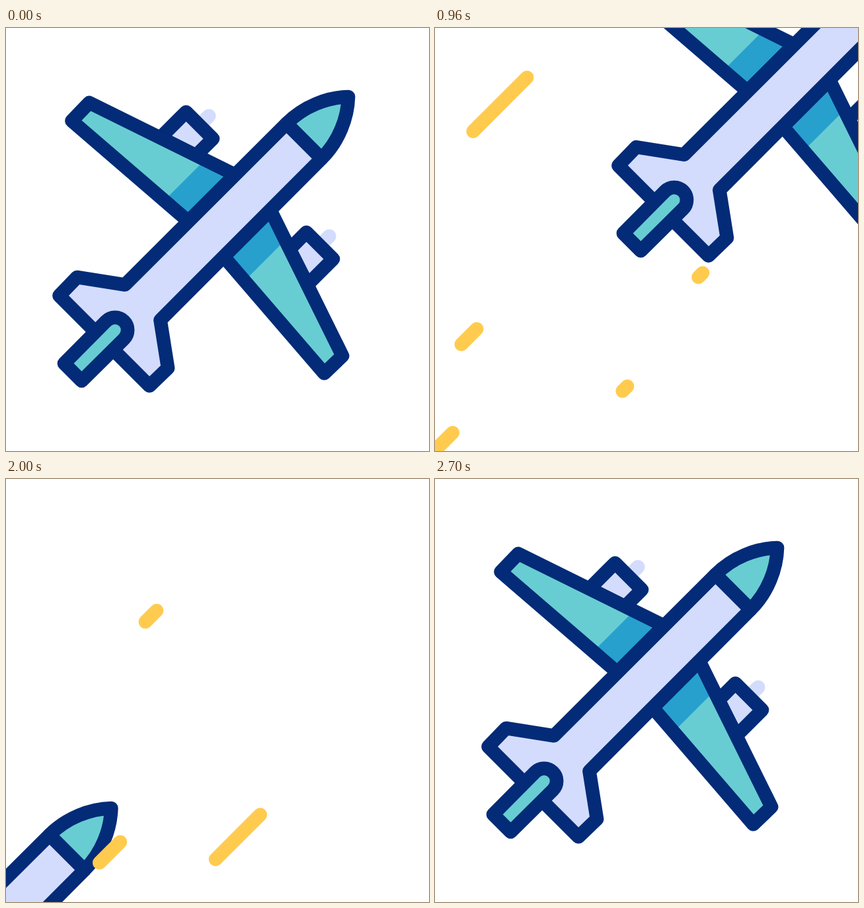
An HTML page that plays this animation: 640 by 640 pixels, repeating every 2.8 s.

```html
<!DOCTYPE html>
<html lang="en">
<head>
<meta charset="utf-8">
<title>Plane</title>
<style>
html, body { margin: 0; width: 100%; height: 100%; overflow: hidden; background: #fff; }
svg { display: block; width: 100vw; height: 100vh; }
.ink { stroke: #032b77; stroke-width: 20.7; stroke-linecap: round; stroke-linejoin: round; }
.pale { fill: #d3dcfd; }
.teal { fill: #68cdd2; }
.blue { fill: #27a0ce; }
.hub { stroke: #d3dcfd; stroke-width: 21; stroke-linecap: round; }
#streaks { stroke: #ffcb4f; stroke-width: 20.7; stroke-linecap: round; }
</style>
</head>
<body>
<svg viewBox="0 0 640 640">
  <defs>
    <path id="wing" d="M126 113 346.5 222 276 292.5 99.5 140.5Z"/>
    <clipPath id="root"><path d="M400 100.5V400H100.5Z"/></clipPath>
    <g id="side">
      <path class="hub" d="M293 147 307 133"/>
      <path class="ink pale" d="M233.7 165.8 272.5 127 313 167.5 287.4 193Z"/>
      <use href="#wing" class="teal"/>
      <use href="#wing" class="blue" clip-path="url(#root)"/>
      <use href="#wing" class="ink" fill="none"/>
    </g>
  </defs>
  <g id="plane">
    <use href="#side"/>
    <use href="#side" transform="matrix(0 -1 -1 0 622 622)"/>
    <path id="body" class="ink pale"/>
    <path class="ink teal" d="M424.5 144.5C451 118 486 105 518 104 517 136 504 171 477.5 197.5Z"/>
    <path class="ink teal" d="M88 507.5 151.5 443.5A19 19 0 0 1 178.5 470.5L114.5 534Z"/>
  </g>
  <g id="streaks"></g>
</svg>
<script>
const LOOP = 2800, GROW = 480, LAG = 203;
const AXIS = 622; // the plane is symmetric about x + y = AXIS
const plane = document.getElementById('plane');
const layer = document.getElementById('streaks');

// one side of the fuselage, nose to tail, closed by its mirror image
const half = [[424.5, 144.5], [180, 388.5], [107.5, 377], [80.5, 405]];
const mirror = ([x, y]) => [AXIS - y, AXIS - x];
const outline = [...half, ...half.map(mirror).reverse()];
document.getElementById('body').setAttribute('d', `M${outline.join('L')}Z`);

// streaks leave at a steady pace in three streams; each falls from x, y by a run along the diagonal
const streams = [
  { first: 212, step: 228, runs: [[93.5, 240, 72.5], [87, 552, 82], [67, 451.5, 41]] },
  { first: 344, step: 254, runs: [[523.5, 252, 125], [175, 39, 138], [291, 542, 56]] },
  { first: 1665, step: 121, runs: [[406, 486.5, 113.5], [173, 549, 75], [228, 199, 171]] }
];
const streaks = streams.flatMap(({ first, step, runs }) => runs.map(([x, y, run], i) => {
  const el = document.createElementNS('http://www.w3.org/2000/svg', 'path');
  layer.append(el);
  return { el, x, y, run, start: first + i * step };
}));

// eased 0..1 progress between two times
function ease(t, start, end) {
  const u = Math.min(1, Math.max(0, (t - start) / (end - start)));
  return u * u * (3 - 2 * u);
}

// draw back, fly off at the top right, return from the bottom left
function planeOffset(t) {
  if (t < 1528) {
    const d = -13.3 * ease(t, 200, 600) + 573 * ease(t, 600, 1480);
    return [d, -d];
  }
  const left = 1 - ease(t, 1528, 2700);
  return [-558 * left, 613 * left];
}

function drawStreak({ el, x, y, run, start }, t) {
  const live = t > start && t < start + LAG + GROW;
  el.style.display = live ? '' : 'none';
  if (!live) return;
  const at = begin => run * ease(t, begin, begin + GROW);
  const head = at(start), tail = at(start + LAG);
  el.setAttribute('d', `M${x - tail} ${y + tail}L${x - head} ${y + head}`);
}

function draw(t) {
  plane.setAttribute('transform', `translate(${planeOffset(t)})`);
  streaks.forEach(s => drawStreak(s, t));
}

const begun = performance.now();
function tick() {
  draw((performance.now() - begun) % LOOP);
  requestAnimationFrame(tick);
}
tick();
</script>
</body>
</html>
```
